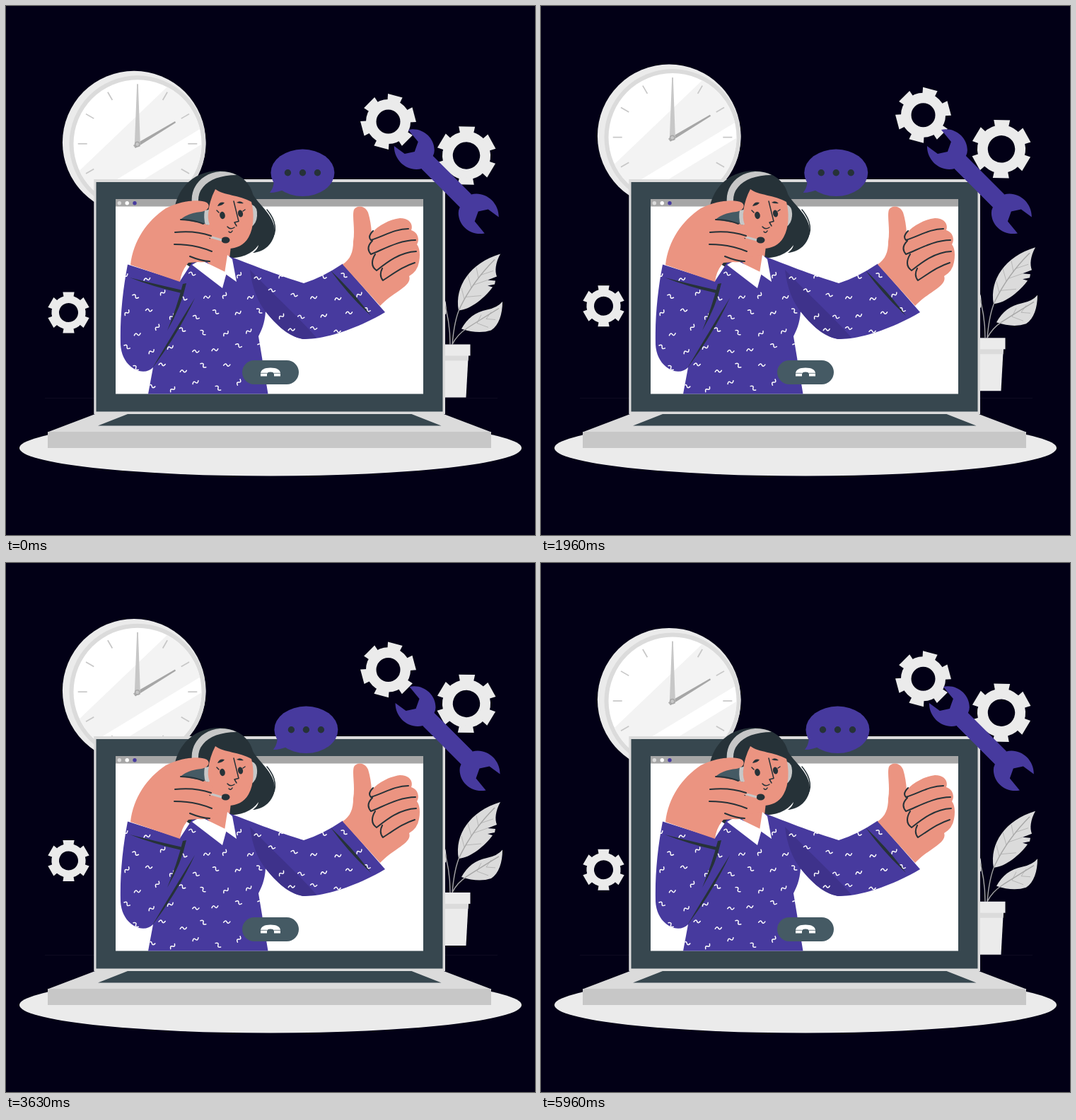
These frames come from a looping animation (748x748 px, 6 s). An HTML page:

```html
<!DOCTYPE html>
<html lang="en">
<head>
<meta charset="utf-8">
<title>Support call</title>
<style>
  html, body { margin: 0; width: 100%; height: 100%; overflow: hidden; background: #020016; }
  svg { display: block; width: 100vw; height: 100vh; }
  .purple { fill: #473a9e; }
  .skin { fill: #eb9481; }
  .dark { fill: #263238; }
  .slate { fill: #37474f; }
  .steel { fill: #455a64; }
  .pale { fill: #ebebeb; }
  .light { fill: #dbdbdb; }
  .mid { fill: #c7c7c7; }
  .grey { fill: #a6a6a6; }
  .white { fill: #fff; }
  .line { fill: none; stroke: #263238; stroke-width: 2; stroke-linecap: round; stroke-linejoin: round; }
  .thin { stroke-width: 1.5; }
  .vein { fill: none; stroke: #a6a6a6; stroke-width: 1.4; }
  .fine { stroke-width: .7; }
  #squiggles { fill: none; stroke: #fff; stroke-width: 1.5; stroke-linecap: round; }
</style>
</head>
<body>
<svg viewBox="0 0 748 748" xmlns="http://www.w3.org/2000/svg">
  <defs>
    <clipPath id="clockFace"><circle cx="186" cy="195.3" r="90.5"/></clipPath>
    <path id="shirt" d="M172,365.5L246,389L263,363L283,361L306,382L313,353C340,363 385,381 421,392Q447,384 476,364.5L536,433C499,455 452,472 420,471C399,467 382,450 367,432C366,449 361,459 357,467L370.5,548.5H201L208,511C203,516 196,518 188,516C172,511 163,496 162,479C161,441 165,402 172,365.5Z"/>
    <clipPath id="shirtClip"><use href="#shirt"/></clipPath>
    <path id="halfWrench" d="M642,284L588,230C569,235 549,220 549,198L564,209L578,206L583,192L569,175C589,171 606,186 606,204Q606,208 604,212L658,266Z"/>
  </defs>

  <path d="M55,554.5H695" stroke="#0e0b21"/>
  <ellipse class="pale" cx="374" cy="625" rx="355" ry="39.5"/>

  <g id="floating">
    <g id="clock">
      <circle class="pale" cx="181.2" cy="193.5" r="101.3"/>
      <circle class="light" cx="186" cy="195.3" r="96.5"/>
      <g clip-path="url(#clockFace)">
        <rect class="white" x="90" y="100" width="190" height="190"/>
        <path d="M100,237L233,110L285,168L120,268ZM285,191L160,267H285Z" fill="#f3f3f3"/>
      </g>
      <g id="ticks" stroke="#c7c7c7" stroke-width="1.7"></g>
      <path class="grey" d="M180,197.5L239,163.5L240,165.5L183,201.5Z"/>
      <path class="mid" d="M181.7,199L185.2,111H186.8L190,199Z"/>
      <circle class="grey" cx="185.7" cy="196" r="3.9"/>
      <circle class="mid" cx="185.7" cy="196" r="2.4"/>
    </g>
    <g id="gears"></g>
    <g id="plant">
      <path class="light" d="M615,405Q625,418 622,436L615,440Z"/>
      <path class="light" d="M640,431C634,397 656,364 699,351C692,364 691,375 694,383L681,388L692,389L691,394L681,396L688,398C678,412 657,430 640,431Z"/>
      <path class="light" d="M644,457C652,442 664,433 680,430Q695,427 702,418.5C702,436 697,452 686,459Q668,465 644,457Z"/>
      <path class="vein" d="M631,479C633,455 636,440 642,427Q660,390 691,359M631,479Q638,465 652,456T697,428M628,479Q628,445 618,415"/>
      <path class="vein fine" d="M648,415L644,399M658,399L653,381M668,385L665,370M650,412L672,410M661,395L681,388M671,381L689,375M666,449L672,437M679,443L686,433M666,449L682,455M679,443L692,444"/>
      <path class="pale" d="M600,490H654L650.5,554H600Z"/>
      <path class="light" d="M600,494H654L653.5,502H600Z"/>
      <rect class="pale" x="600" y="479" width="56.5" height="16"/>
    </g>
  </g>

  <g id="laptop">
    <rect class="light" x="124.3" y="245" width="496.7" height="332"/>
    <rect class="slate" x="127.5" y="249" width="490" height="324.5"/>
    <rect class="white" x="155" y="273" width="435" height="275.5"/>
    <rect class="grey" x="155" y="273" width="435" height="10.5"/>
    <circle class="light" cx="160.3" cy="278.8" r="2.7"/>
    <circle class="white" cx="171.2" cy="278.8" r="2.7"/>
    <circle class="purple" cx="182" cy="278.8" r="2.7"/>
    <path class="light" d="M126,577H619L686,602.5H59Z"/>
    <path class="slate" d="M172,577H573.500L615.5,593.5H130Z"/>
    <rect class="mid" x="59" y="602" width="627" height="23"/>
  </g>

  <g id="head">
    <path class="dark" d="M238,287C244,254 268,233 302,233C331,234 345,250 349,266C356,280 380,296 380,318C379,336 365,348 349,349Q356,344 357,338C348,351 332,357 310,357L262,370L250,362Z"/>
    <path class="line thin" d="M369,288Q389,312 374,333"/>
    <path class="mid" d="M263,279C260,256 277,236 303,234Q317,234 326,239C303,239 286,246 278,257Q271,265 272,279Z"/>
    <path class="mid" d="M348,281Q356,284 355,297Q354,308 347,312Z"/>
    <path class="skin" d="M284,345L290,325L318,340L313,381L306,381L280,363Z"/>
    <path class="skin" d="M296,259C308,268 330,267 347,277C351,292 351,313 343,327C335,341 320,345 306,342C291,337 283,322 285,298Q287,276 296,259Z"/>
    <g class="dark">
      <ellipse cx="306" cy="296" rx="3.8" ry="5.2" transform="rotate(-12 306 296)"/>
      <ellipse cx="331.5" cy="293.5" rx="3.5" ry="5" transform="rotate(-12 331.5 293.5)"/>
      <path d="M299,283Q302,276 309,278Q307,282 299,283ZM326,278Q331,274 336,279Q332,280 326,278Z"/>
      <ellipse cx="310.5" cy="331" rx="6" ry="4.5"/>
    </g>
    <path class="line thin" d="M322,276L329,304.5L323,306L326,311M301,292L298,289M335,290L338,288M313,312Q317,317 323,313M315,319Q318,322 320,318"/>
    <path d="M284,325L305,331" stroke="#c7c7c7" stroke-width="3"/>
  </g>

  <g id="body">
    <use href="#shirt" class="purple"/>
    <path d="M345,373C348,399 356,418 367,432C383,452 399,467 420,471L439,469C416,442 384,414 345,373Z" fill="#3e328b"/>
    <path class="skin" d="M286,356L313,352L311,382L304,380Z"/>
    <g id="squiggles" clip-path="url(#shirtClip)"></g>
    <path class="white" d="M263,366L275,359L312,377L306,399ZM313,352L320,358L326,390L309,378Z"/>
    <path class="dark" d="M175,384Q210,393 250,402L248,406Q208,397 175,384ZM250,393L255,392Q248,425 228,459Q242,425 250,393ZM267,413Q244,463 207,512Q241,455 267,413ZM459,374Q491,404 516,438Q486,411 459,374Z"/>
  </g>

  <g id="hands">
    <path class="steel" d="M244,302Q259,290 284,288L282,308Z"/>
    <path class="mid" d="M281,289L287,288Q284,299 288,309L282,310Q279,299 281,289Z"/>
    <path class="skin" d="M176,366C180,332 199,304 226,286C246,276 273,272 284,278C290,283 285,290 276,291C264,292 253,296 247,302L277,307C289,310 294,316 294,322Q293,327 287,328Q295,334 293,342Q292,347 287,348Q295,352 292,359Q287,363 272,362L258,363Q248,374 246,390Z"/>
    <path class="line" d="M239,320Q267,317 290,325M238,337Q266,337 291,347M260,354Q277,361 288,361M247,302Q264,302 279,308"/>
    <path class="skin" d="M476,365.5C487,358 491,348 491,333C494,315 489,297 492,288C496,281 508,282 512,292Q516,305 517,321C527,310 542,302 557,300C571,300 576,309 573,317C583,320 585,331 581,337Q587,345 584,362Q582,375 570,382C575,396 546,405 529,424Z"/>
    <path class="line" d="M569,315C550,315 535,325 516,331Q511,326 519,318M579,331C556,331 534,344 516,351Q508,342 518,332M580,347C557,348 539,362 524,374Q513,366 522,351M578,363C562,368 550,377 533,388Q527,381 532,371"/>
  </g>

  <g id="hangUp">
    <rect class="steel" x="334" y="501" width="80" height="34" rx="17"/>
    <path class="white" d="M360,519Q361,511.5 374,511.5T388,519V523.5H379V520.5Q379,517.5 374,517.5T369,520.5V523.5H360Z"/>
    <path d="M360,519.3H369M379,519.3H388" stroke="#455a64" stroke-width=".8"/>
  </g>

  <g id="wrench" class="purple">
    <use href="#halfWrench"/>
    <use href="#halfWrench" transform="rotate(180 623 248.2)"/>
  </g>
  <g id="bubble">
    <path class="purple" d="M379,246Q379,257 373,264Q384,264 397,258Z"/>
    <ellipse class="purple" cx="419.5" cy="235.8" rx="45" ry="33.2"/>
    <path d="M398.5,235.7h.01m21,0h.01m21,0h.01" stroke="#263238" stroke-width="9.4" stroke-linecap="round"/>
  </g>
</svg>
<script>
  const UNIT = 748 / 500;
  const el = id => document.getElementById(id);
  const repeat = (count, make) => Array.from({ length: count }, (_, i) => make(i)).join('');

  function gear(x, y, radius, hole, turn) {
    const root = radius * .83;
    const tooth = `M${root - 3},${-radius * .23}L${radius},${-radius * .28}V${radius * .28}L${root - 3},${radius * .23}Z`;
    return `<g transform="translate(${x} ${y}) rotate(${turn})" fill="#ebebeb">
      <circle r="${(root + hole) / 2}" fill="none" stroke="#ebebeb" stroke-width="${root - hole}"/>
      ${repeat(6, i => `<path d="${tooth}" transform="rotate(${i * 60})"/>`)}</g>`;
  }

  function seededRandom(seed) {
    return () => (seed = seed * 16807 % 2147483647) / 2147483647;
  }

  // Staggered rows with a little jitter, cut to the shirt.
  function squiggles() {
    const random = seededRandom(11);
    const jitter = size => (random() - .5) * size;
    return repeat(13 * 7, i => {
      const row = Math.floor(i / 13);
      const x = 172 + (i % 13) * 31 + (row % 2) * 15 + jitter(8);
      const y = 382 + row * 26 + jitter(12);
      return `<path d="M-4.5,1Q-2,-3.5 0,0T4.5,-1" transform="translate(${x} ${y}) rotate(${jitter(110)})"/>`;
    });
  }

  el('gears').innerHTML =
    gear(540.5, 164, 38, 17, 45) + gear(651, 212, 41, 19.2, 31) + gear(88.5, 434, 29, 13.5, 30);
  el('ticks').innerHTML = repeat(12, i => `<path d="M186,111V124" transform="rotate(${i * 30} 186 195.3)"/>`);
  el('squiggles').innerHTML = squiggles();

  // Swings out and back through the same stops, mirrored at half time.
  function shake(t, period) {
    const stops = [0, -1, 2, -4, 4, -4];
    const phase = (t % period) / period * 10;
    const p = Math.min(phase, 10 - phase);
    const i = Math.min(Math.floor(p), 4);
    return UNIT * (stops[i] + (stops[i + 1] - stops[i]) * (p - i));
  }

  function float(t) {
    return -10 * UNIT * (1 - Math.abs(1 - (t % 1500) / 750));
  }

  function move(id, x, y) {
    el(id).setAttribute('transform', `translate(${x.toFixed(2)} ${y.toFixed(2)})`);
  }

  function draw() {
    const t = performance.now() + 25;
    move('floating', 0, float(t));
    move('wrench', shake(t, 1500), 0);
    move('bubble', shake(t, 6000), 0);
    requestAnimationFrame(draw);
  }
  draw();
</script>
</body>
</html>
```
